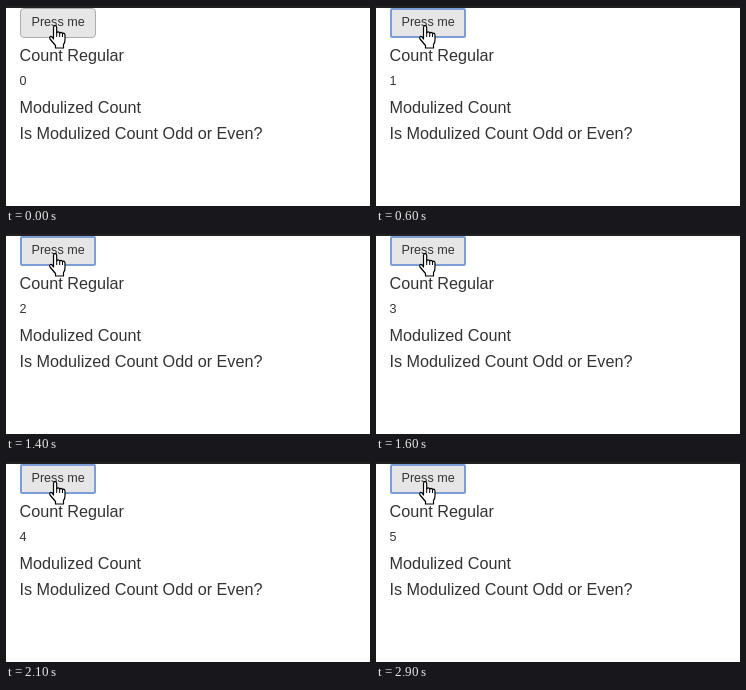
An HTML page that plays this animation: 364x200 px, repeating every 3000 ms.

```html
<!DOCTYPE html>
<html lang="en">
<head>
<meta charset="utf-8">
<title>Press counter</title>
<style>
  html, body { margin: 0; width: 100%; height: 100%; overflow: hidden; background: #fff; }
  svg { position: absolute; left: 0; top: 0; }
  text { font-family: "Liberation Sans", Arial, sans-serif; fill: #333; }
  .heading { font-size: 16.2px; }
  .small { font-size: 12.6px; }
  #button {
    position: absolute; left: 14px; top: 2px; width: 76px; height: 30px;
    box-sizing: border-box; border: 1px solid #adadad; border-radius: 4px;
    background: #e6e6e6;
  }
  #button.focus { border: 2px solid #7b9ed6; border-radius: 2px; }
  #button.down { background: #d4d2d2; box-shadow: inset 0 3px 5px rgba(0, 0, 0, .125); }
</style>
</head>
<body>
<div id="button"></div>
<svg width="364" height="200" viewBox="0 0 364 200">
  <rect width="364" height="2" fill="#222"/>
  <text class="small" x="25.5" y="20">Press me</text>
  <text class="heading" x="13.5" y="55">Count Regular</text>
  <text class="small" id="count" x="13.5" y="79">0</text>
  <text class="heading" x="13.5" y="107">Modulized Count</text>
  <text class="heading" x="13.5" y="133">Is Modulized Count Odd or Even?</text>
  <path fill="#fff" stroke="#000" stroke-width="1.2" stroke-linejoin="round"
    d="M47.5 33V21.5q0-1.8 1.6-1.8t1.6 1.8V27q.3-1.2 1.5-1.2t1.5 1.6q.3-1 1.4-1t1.4 1.6q.3-.8 1.2-.8t1.3 1.6V34q0 2.5-1.5 4.5V42H49.5V39.5L44 33q-1-1.7.3-2.5t3.2 2.5Z"/>
  <path fill="none" stroke="#000" d="M50.7 26.5V31M53.7 27.5V31M56.5 28V31"/>
</svg>
<script>
  const button = document.getElementById("button");
  const count = document.getElementById("count");
  const presses = [500, 900, 1300, 1800, 2300];
  const updates = [600, 1100, 1500, 2000, 2500];

  function draw() {
    const t = performance.now() % 3000;
    button.classList.toggle("focus", t >= presses[0]);
    button.classList.toggle("down", presses.some(p => t >= p && t < p + 100));
    count.textContent = updates.filter(u => t >= u).length;
    requestAnimationFrame(draw);
  }
  draw();
</script>
</body>
</html>
```
